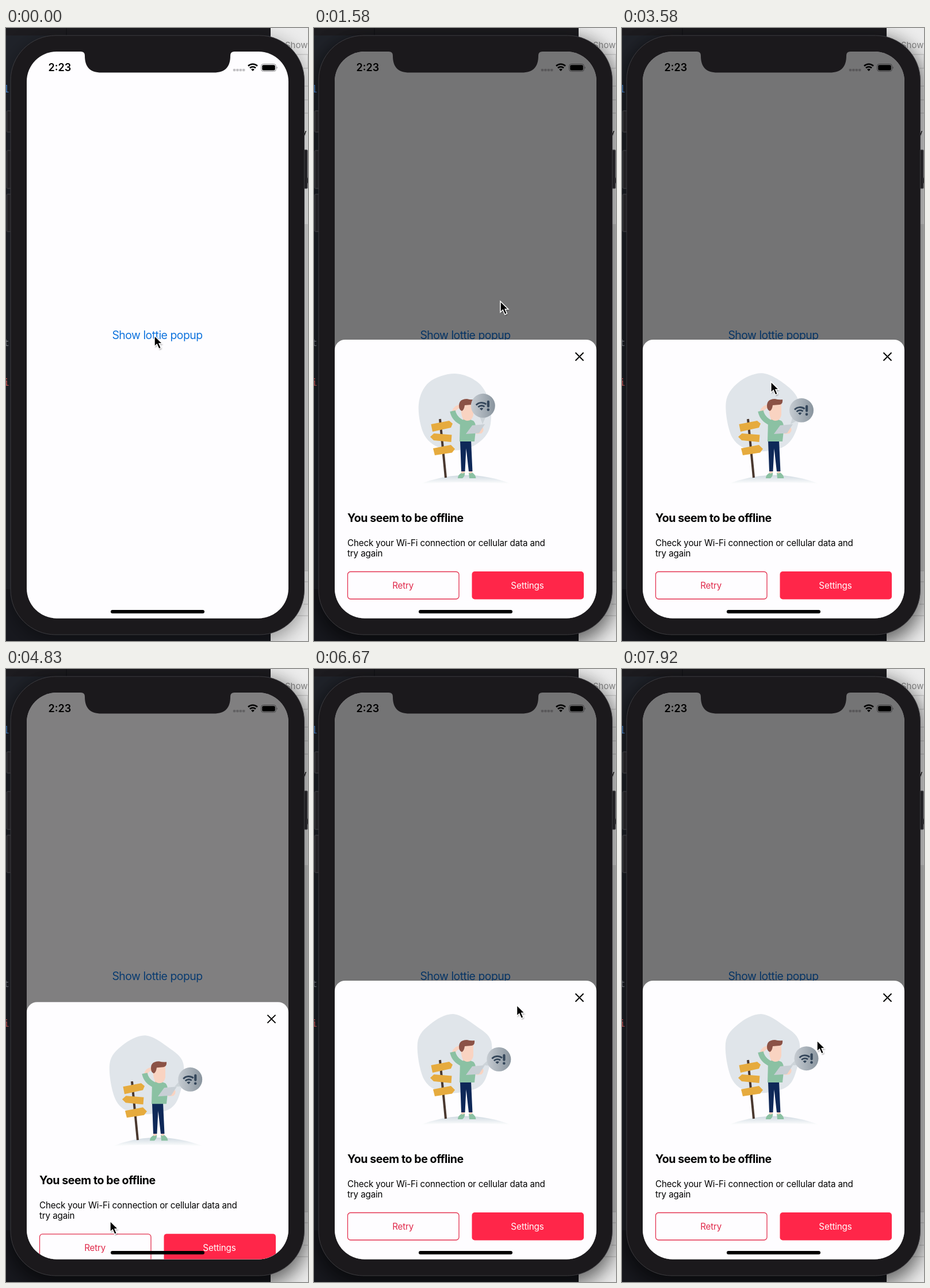
An HTML page that plays this animation: 525 by 1066 pixels, repeating every 8000 ms.

```html
<!DOCTYPE html>
<html lang="en">
<head>
<meta charset="utf-8">
<title>Offline popup</title>
<style>
  html, body { margin: 0; width: 100%; height: 100%; overflow: hidden; background: #1b191c; }
  svg { display: block; width: 525px; height: 1066px; font-family: Inter, "Open Sans", sans-serif; }
  .code { font: 16px "Noto Sans Mono", "DejaVu Sans Mono", monospace; }
  .mid { text-anchor: middle; }
</style>
</head>
<body>
<svg viewBox="0 0 525 1066">
  <defs>
    <clipPath id="screen"><rect x="36" y="41" width="455" height="985.5" rx="52"/></clipPath>
    <filter id="blur" x="-30%" y="-20%" width="160%" height="140%"><feGaussianBlur stdDeviation="17"/></filter>
    <filter id="soft" x="-50%" y="-50%" width="200%" height="200%"><feGaussianBlur stdDeviation="1.2"/></filter>
    <linearGradient id="ground" x2="0" y2="1"><stop stop-color="#cfd9e1"/><stop offset="1" stop-color="#fff"/></linearGradient>
    <linearGradient id="ball"><stop stop-color="#c6ccd2"/><stop offset="1" stop-color="#89949e"/></linearGradient>
    <linearGradient id="barFade"><stop stop-color="#444"/><stop offset=".8" stop-color="#777"/><stop offset="1" stop-color="#a0a0a0"/></linearGradient>
    <g id="wifi" fill="none" stroke="currentColor">
      <path d="M-8 -2.5A11.6 11.6 0 0 1 8 -2.5M-5 1A7.3 7.3 0 0 1 5 1" stroke-width="2.6"/>
      <path d="M0 6.5L-2.9 3.6A4.1 4.1 0 0 1 2.9 3.6Z" fill="currentColor" stroke="none"/>
    </g>
  </defs>

  <!-- windows behind the phone -->
  <rect width="460" height="1066" fill="#20232a"/>
  <rect width="460" height="13" fill="#1d1c20"/>
  <path d="M0 976H460V1066H0Z" fill="#18191f"/>
  <path d="M105 0V13" stroke="#111114"/>
  <rect x="460" width="65" height="1066" fill="#ececec"/>
  <rect x="517" y="341" width="8" height="603" fill="#d6d6d6"/>
  <path d="M500 46H525V70H500M517 101H525M517 125H525M517 148H525M517 944H525M517 963H525M517 1002H525M490 1022H525" fill="none" stroke="#bdbdbd"/>
  <text x="485" y="35" font-size="15" fill="#858585">Show</text>
  <text x="514" y="188" font-size="15">y</text>
  <text x="522" y="270" font-size="15">(</text>
  <g class="code">
    <text x="-4" y="112" fill="#4a90e0">l</text>
    <text x="-4" y="553" fill="#868b93">t</text>
    <text x="-4" y="622" fill="#e0605e">i</text>
    <text x="4" y="622" fill="#e0605e">:</text>
  </g>
  <rect x="8" y="20" width="510" height="1046" rx="78" filter="url(#blur)" opacity=".38"/>
  <rect id="focus" x="4" y="20" width="518" height="1050" rx="78" filter="url(#blur)"/>

  <!-- phone -->
  <g fill="#222124" stroke="#454548">
    <rect x="1.5" y="144" width="8" height="37" rx="1"/>
    <rect x="1.5" y="213" width="8" height="66" rx="1"/>
    <rect x="1.5" y="289" width="8" height="65" rx="1"/>
    <rect x="516" y="212" width="8" height="67" rx="1"/>
  </g>
  <rect x="8" y="13" width="510.5" height="1042" rx="78" fill="#1b191c" stroke="#3d3c40"/>

  <g clip-path="url(#screen)">
    <rect x="36" y="41" width="455" height="986" fill="#fefdff"/>
    <text x="73.5" y="75" font-size="18" font-weight="600">2:23</text>
    <g fill="#c2c1c4">
      <rect x="394.8" y="71" width="4.4" height="4.2" rx="1.2"/><rect x="400.2" y="71" width="4.4" height="4.2" rx="1.2"/>
      <rect x="405.6" y="71" width="4.4" height="4.2" rx="1.2"/><rect x="411" y="71" width="4.4" height="4.2" rx="1.2"/>
    </g>
    <use href="#wifi" x="429" y="68.5"/>
    <rect x="443.5" y="62.5" width="26" height="13" rx="4" fill="none" stroke="#8e8d90"/>
    <rect x="445.2" y="64.2" width="22.6" height="9.6" rx="2.4"/>
    <path d="M470.8 66.8Q473 69 470.8 71.2Z" fill="#8e8d90"/>
    <text class="mid" x="263" y="541" font-size="19.4" letter-spacing="-.5" fill="#0f73dd">Show lottie popup</text>
    <rect id="dim" x="36" y="41" width="455" height="986"/>

    <g id="sheet">
      <rect x="36" y="542" width="455" height="540" rx="18" fill="#fefdff"/>
      <path d="M454.5 564.5L468.5 578.5M468.5 564.5L454.5 578.5" stroke="#000" stroke-width="1.9"/>

      <path id="blob" fill="#e0e5ea"/>
      <path d="M184 793Q263 762 344 793Q263 787 184 793Z" fill="url(#ground)"/>
      <path d="M219 680L229 782" stroke="#4a382f" stroke-width="4"/>
      <g fill="#e6ab3e">
        <path d="M203.500 689L235 683L241 688L238 695L206 702Z"/>
        <path d="M202 711L208.500 705L239.500 707.500L238.500 720L208 717Z"/>
        <path d="M207 731L238 725L245 732L240 738.500L210 743Z"/>
      </g>
      <path d="M256 770h6v7h-6zM270 770h5v7h-5z" fill="#f9d3c1"/>
      <path d="M254 717H273L275.500 771H269L264.500 731L262.500 771H256Z" fill="#0e2858"/>
      <path d="M250 783Q250 777 256 774Q259 776 262 773Q263 779 258 783ZM269 773Q272 776 275 773Q281 777 281.500 783H270Z" fill="#8bc1a3"/>
      <path d="M243 667Q245 659 254 658" fill="none" stroke="#f9d3c1" stroke-width="6" stroke-linecap="round"/>
      <path d="M259 676H272V686H259Z" fill="#f4c5b1"/>
      <path d="M241 666Q244 681 260 687" fill="none" stroke="#8bc1a3" stroke-width="9.500"/>
      <path d="M254 684Q265 677 277 683Q282 687 281 700L279 719H253Z" fill="#8bc1a3"/>
      <path d="M255 653H277V673Q275 683 266 683Q257 682 256 668Z" fill="#f9d3c1"/>
      <path d="M252 657Q252 645 266 645Q273 647 279 646Q280 654 274 655L262 656Q261 664 257 666Q252 664 252 657Z" fill="#8b5246"/>
      <path d="M284 700L294 695Q296 701 291 705L282 706Z" fill="#f9d3c1"/>
      <path d="M264 706L275 691L297 689L287 704.500Z" fill="#c8cfd5"/>

      <path id="tail" fill="#cdd4d9"/>
      <g id="bubble">
        <circle r="21" fill="url(#ball)"/>
        <g color="#34465a" fill="#34465a">
          <use href="#wifi" transform="translate(-3 1) rotate(-4) scale(1.1)"/>
          <rect x="7" y="-9" width="4.200" height="12" rx="2"/><circle cx="9" cy="7" r="2.300"/>
        </g>
      </g>

      <text x="58" y="859" font-size="19.6" font-weight="700" letter-spacing="-.44">You seem to be offline</text>
      <g font-size="15.2" letter-spacing="-.15">
        <text x="58" y="901">Check your Wi-Fi connection or cellular data and</text>
        <text x="58" y="919">try again</text>
        <rect x="58.500" y="945.500" width="193.500" height="47.500" rx="5" fill="none" stroke="#e3314f" stroke-width="1.300"/>
        <rect x="274.500" y="945" width="194.500" height="48.500" rx="5" fill="#ff2649"/>
        <text class="mid" x="154.700" y="975" fill="#e0294a">Retry</text>
        <text class="mid" x="371" y="975" fill="#fff">Settings</text>
      </g>
    </g>
    <rect x="182" y="1012" width="163" height="6" rx="3"/>
    <rect id="bar" x="182" y="1012" width="163" height="6" rx="3" fill="url(#barFade)"/>
  </g>
  <path d="M130 40H397V41Q390 41 390 48C390 68 381 77.500 361 77.500H166C146 77.500 137 68 137 48Q137 41 130 41Z" fill="#1b191c"/>

  <g id="cursor">
    <path d="M1 3V21L5 17L9 25L13 23L9 16H15Z" opacity=".35" filter="url(#soft)"/>
    <path d="M0 0V19L4.300 15L7.800 23L11.500 21.400L8.200 13.800H13.800Z" stroke="#fff" stroke-width="1.500"/>
  </g>
</svg>

<script>
const LOOP = 8000, STEP = 1000 / 12, TRAVEL = 484;
const el = id => document.getElementById(id);
const [focus, dim, sheet, blob, tail, bubble, bar, cursor] =
  ['focus', 'dim', 'sheet', 'blob', 'tail', 'bubble', 'bar', 'cursor'].map(el);

// rows of [time, value, ...]
const FOCUS = [[60, 0], [330, 1]];
const OPEN = [[640, 0], [940, 1], [1900, 1], [2170, 0], [3050, 0], [3290, 1], [4798, 1], [5006, 0],
  [6300, 0], [6580, 1], [6830, 1], [7333, .9525], [7580, .897], [7850, 1]];
const BAR = [[1000, 0], [1250, 1], [1333, 1], [1550, 0]];
const CURSOR = [[0, 258, 535], [740, 258, 535], [1330, 324, 476], [1950, 324, 474], [2900, 276, 539],
  [3250, 276, 539], [4480, 181, 960], [4840, 181, 960], [5000, 212, 610], [5600, 293, 537],
  [6330, 293, 537], [6800, 367, 596], [7333, 367, 619], [7580, 352, 646], [7920, 339, 646]];
const STARTS = [950, 3300, 6600], SWING = 1420;

const ROUND = [[245, 601], [286, 617], [306, 655], [303, 702], [270, 730], [225, 732], [192, 708], [182, 655], [200, 616]];
const BUMPY = [[242, 600], [282, 621], [308, 647], [304, 695], [285, 728], [230, 737], [192, 715], [180, 650], [203, 617]];

const mix = (a, b, k) => a + (b - a) * k;

function track(rows, t) {
  const i = rows.findIndex(r => r[0] > t);
  if (i === 0) return rows[0].slice(1);
  if (i < 0) return rows[rows.length - 1].slice(1);
  const a = rows[i - 1], b = rows[i];
  const u = (t - a[0]) / (b[0] - a[0]), k = u * u * (3 - 2 * u);
  return a.slice(1).map((v, j) => mix(v, b[j + 1], k));
}

// closed Catmull-Rom curve
function smooth(pts) {
  const n = pts.length, at = i => pts[(i + n) % n];
  let d = `M${pts[0]}`;
  for (let i = 0; i < n; i++) {
    const [p, a, b, q] = [at(i - 1), at(i), at(i + 1), at(i + 2)];
    d += `C${a.map((v, j) => v + (b[j] - p[j]) / 6)} ${b.map((v, j) => v - (q[j] - a[j]) / 6)} ${b}`;
  }
  return d + 'Z';
}

function drawSwing(t) {
  const start = STARTS.filter(s => s <= t).pop() ?? t;
  const c = Math.cos((t - start) / SWING * 2 * Math.PI), k = (c + 1) / 2;
  blob.setAttribute('d', smooth(ROUND.map((p, i) => p.map((v, j) => mix(v, BUMPY[i][j], k)))));

  const x = 307.5 + 14.5 * c, y = 660.5 + 11.4 * c + 8 * c * c;
  bubble.setAttribute('transform', `translate(${x} ${y})`);
  const tip = [293, 689], dx = x - tip[0], dy = y - tip[1], len = Math.hypot(dx, dy);
  const nx = -dy / len * 13, ny = dx / len * 13;
  tail.setAttribute('d', `M${tip}L${x + nx} ${y + ny}L${x - nx} ${y - ny}Z`);
}

function draw(t) {
  const [open] = track(OPEN, t);
  focus.setAttribute('opacity', track(FOCUS, t)[0] * .35);
  dim.setAttribute('opacity', open * .54);
  sheet.setAttribute('transform', `translate(0 ${(1 - open) * TRAVEL})`);
  bar.setAttribute('opacity', track(BAR, t)[0]);
  cursor.setAttribute('transform', `translate(${track(CURSOR, t)})`);
  drawSwing(t);
}

const t0 = performance.now();
function tick(now) {
  const t = Math.max(0, now - t0) % LOOP;
  draw(Math.floor((t + 5) / STEP) * STEP);
  requestAnimationFrame(tick);
}
draw(0);
requestAnimationFrame(tick);
</script>
</body>
</html>
```
